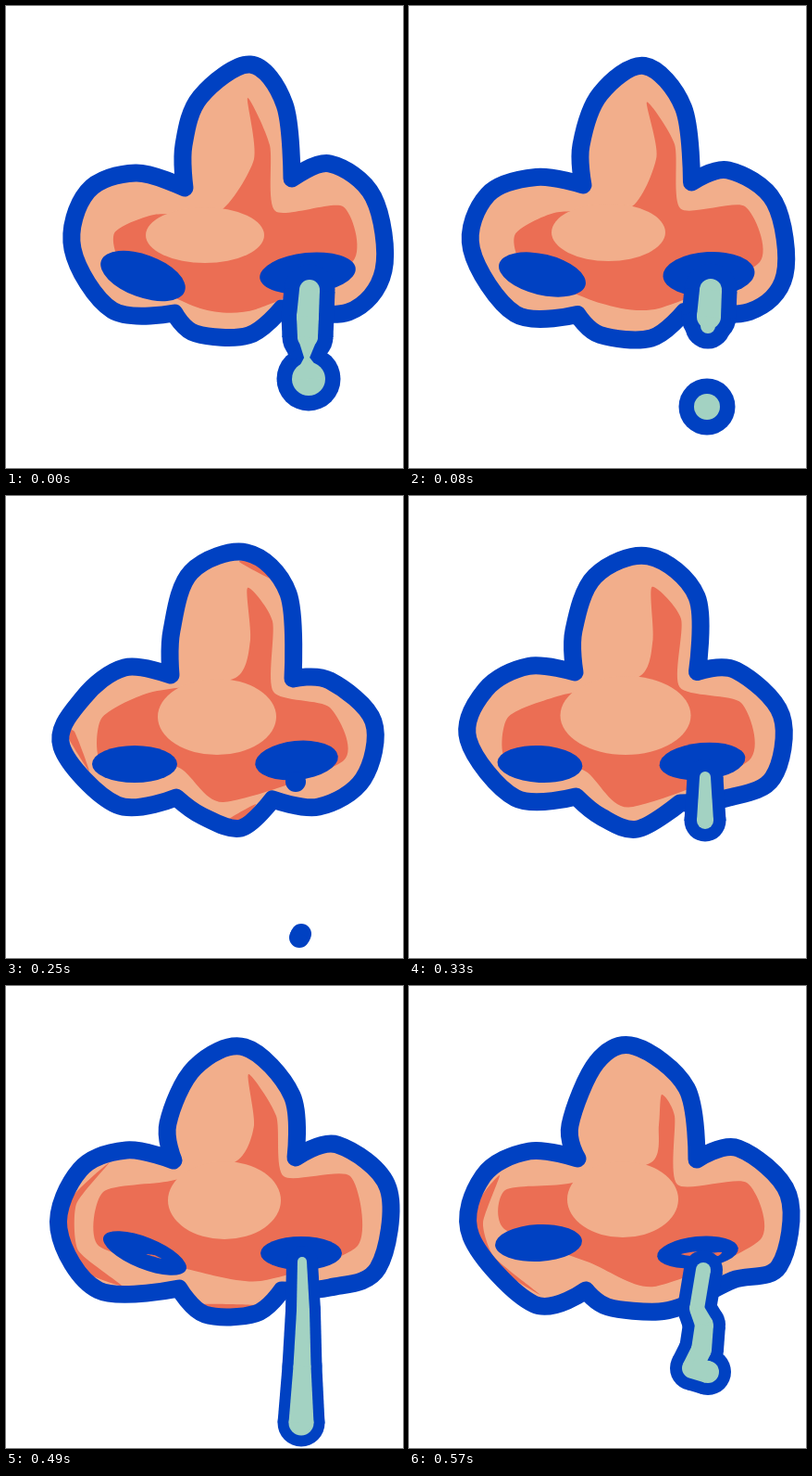
An HTML page with a canvas that plays this animation: 429 by 498 pixels, repeating every 630 ms.

```html
<!DOCTYPE html>
<html lang="en">
<head>
<meta charset="utf-8">
<title>Runny nose</title>
<style>
html, body { margin: 0; width: 100%; height: 100%; overflow: hidden; background: #fff; }
canvas { display: block; }
</style>
</head>
<body>
<canvas id="stage" width="429" height="498"></canvas>
<script>
const ctx = document.getElementById('stage').getContext('2d');
const BLUE = '#0041c2', SKIN = '#f2ae8b', RED = '#eb6e54', MUCUS = '#a3d2c2';
const LOOP = 630, LINE = 19;

const pairs = flat => flat.filter((_, i) => i % 2 === 0).map((x, i) => [x, flat[2 * i + 1]]);

// closed spline through the points; at corners the tangent is zero
function trace(flat, tension, isCorner = () => false) {
  const p = pairs(flat), n = p.length;
  const tangent = i => isCorner(i % n) ? [0, 0]
    : [0, 1].map(k => (p[(i + 1) % n][k] - p[(i + n - 1) % n][k]) * tension);
  ctx.beginPath();
  ctx.moveTo(...p[0]);
  for (let i = 0; i < n; i++) {
    const a = p[i], b = p[(i + 1) % n], u = tangent(i), v = tangent(i + 1);
    ctx.bezierCurveTo(a[0] + u[0], a[1] + u[1], b[0] - v[0], b[1] - v[1], ...b);
  }
  ctx.closePath();
}

function paint(color) {
  ctx.fillStyle = color;
  ctx.fill();
}

function oval(color, [x, y, rx, ry, tilt = 0]) {
  ctx.beginPath();
  ctx.ellipse(x, y, rx, ry, tilt, 0, Math.PI * 2);
  paint(color);
}

function patch(color, ...flat) {
  trace(flat, 0.1);
  paint(color);
}

// chain of x, y, radius nodes joined into one tube
function tube(color, nodes, grow) {
  let last;
  for (let i = 0; i < nodes.length; i += 3) {
    const [x, y] = nodes.slice(i), r = nodes[i + 2] + grow;
    if (r <= 0) continue;
    oval(color, [x, y, r, r]);
    if (last) {
      const d = Math.hypot(x - last.x, y - last.y);
      const nx = (last.y - y) / d, ny = (x - last.x) / d;
      ctx.beginPath();
      ctx.moveTo(last.x + nx * last.r, last.y + ny * last.r);
      ctx.lineTo(x + nx * r, y + ny * r);
      ctx.lineTo(x - nx * r, y - ny * r);
      ctx.lineTo(last.x - nx * last.r, last.y - ny * last.r);
      paint(color);
    }
    last = { x, y, r };
  }
}

function drip(rim, ...nodes) {
  tube(BLUE, nodes, rim);
  tube(MUCUS, nodes, 0);
}

// outline runs clockwise from the left notch
const isDent = i => [0, 5, 10, 13].includes(i);

function drawNose(nose, slivers = () => {}) {
  trace(nose.outline, 0.17, isDent);
  paint(SKIN);
  trace(nose.red, 0.12);
  paint(RED);
  oval(SKIN, nose.light);
  slivers();
  trace(nose.outline, 0.17, isDent);
  ctx.strokeStyle = BLUE;
  ctx.lineWidth = LINE;
  ctx.lineJoin = 'round';
  ctx.stroke();
  oval(BLUE, nose.left);
  oval(BLUE, nose.right);
}

const blend = (a, b) => Object.fromEntries(
  Object.keys(a).map(k => [k, a[k].map((v, i) => (v + b[k][i]) / 2)]));

const swollen = {
  outline: [193,196, 192,150, 210,98, 264,63, 301,106, 309,186, 350,170, 397,206, 408,285,
    370,330, 298,326, 262,355, 205,353, 182,331, 115,328, 72,262, 88,200, 140,180],
  red: [160,225, 117,245, 130,285, 210,326, 270,327, 375,275, 364,216, 291,221, 285,150,
    261,99, 268,165, 230,222],
  light: [215, 247, 64, 30],
  left: [148, 291, 48, 23, 0.35],
  right: [326, 288, 52, 22, -0.1]
};
const pointed = {
  outline: [183,190, 180,150, 203,92, 245,66, 292,113, 302,194, 340,184, 393,217, 404,295,
    366,329, 297,333, 262,361, 208,356, 182,334, 115,336, 63,262, 82,207, 135,189],
  red: [158,220, 112,248, 125,285, 205,315, 270,325, 383,277, 362,216, 296,216, 289,148,
    253,108, 267,160, 248,213],
  light: [216, 241, 59, 32],
  left: [140, 288, 48, 21, 0.12],
  right: [322, 290, 47, 26, 0]
};
const squat = {
  outline: [178,193, 179,145, 200,82, 260,61, 305,105, 310,197, 350,199, 397,243, 386,305,
    338,335, 288,327, 254,358, 212,345, 184,325, 120,333, 60,270, 83,218, 128,185],
  red: [155,212, 103,240, 105,290, 185,292, 235,330, 365,285, 350,228, 289,211, 288,135,
    261,99, 264,155, 248,196],
  light: [228, 238, 64, 41],
  left: [139, 289, 46, 20, 0],
  right: [314, 285, 45, 21, -0.1]
};
const rounded = {
  outline: [180,187, 177,145, 202,91, 258,69, 317,112, 313,182, 357,177, 408,230, 400,303,
    350,316, 298,335, 240,360, 204,347, 177,323, 110,318, 68,255, 82,200, 130,182],
  red: [165,220, 110,238, 108,285, 190,298, 240,341, 370,285, 368,218, 296,201, 300,130,
    264,97, 263,155, 250,193],
  light: [240, 235, 77, 44],
  left: [144, 289, 46, 20, 0.1],
  right: [320, 287, 48, 19, -0.08]
};
const wide = {
  outline: [181,188, 175,148, 204,88, 258,66, 309,118, 313,185, 358,171, 413,218, 402,304,
    350,325, 298,328, 270,353, 215,354, 187,326, 100,328, 57,262, 80,198, 130,177],
  red: [178,210, 105,222, 100,280, 195,305, 275,318, 380,280, 372,205, 300,205, 292,140,
    262,95, 268,150, 250,188],
  light: [236, 231, 61, 42],
  left: [150, 288, 48, 17, 0.38],
  right: [319, 288, 44, 18, 0]
};
const narrow = {
  outline: [182,186, 174,150, 203,82, 244,65, 300,110, 311,187, 356,175, 410,225, 400,302,
    350,317, 303,342, 270,351, 215,346, 191,328, 135,343, 67,270, 80,205, 130,178],
  red: [172,213, 104,220, 103,262, 195,298, 265,324, 380,273, 365,212, 290,214, 287,140,
    273,117, 270,150, 262,190],
  light: [231, 230, 60, 41],
  left: [140, 277, 47, 20, -0.05],
  right: [312, 287, 44, 17, -0.1]
};
const deflating = blend(swollen, pointed);
const filling = blend(squat, rounded);

function hanging() {
  drawNose(swollen, () => patch(RED, 297,130, 301,155, 302,180));
  drip(16.5, 328,306,11, 326,335,12, 326,357,11, 325,379,3, 327,402,18);
}

function breaking() {
  drawNose(deflating);
  drip(16.5, 326,306,12, 324,335,13, 323,345,8);
  drip(16.5, 322,432,14);
}

function falling() {
  drawNose(pointed);
  patch(RED, 124,287, 135,285, 150,289);
  drip(16.5, 307,315,17, 331,307,23);
  drip(16.5, 319,455,11);
}

function dry() {
  drawNose(squat, () => {
    patch(RED, 252,71, 276,71, 294,93);
    patch(RED, 238,350, 255,350, 270,332);
    patch(RED, 66,258, 74,254, 90,297);
  });
  drip(11, 313,308,0);
  drip(11, 319,472,0, 317,476,0);
}

function welling() {
  drawNose(filling);
  drip(13.5, 320,303,6, 320,350,9);
}

function running() {
  drawNose(rounded, () => {
    patch(RED, 357,184, 382,196, 401,233);
    patch(RED, 138,310, 178,308, 179,318, 138,318);
  });
  drip(13.5, 321,303,7, 320,360,11, 319,402,13);
}

function stretched() {
  drawNose(wide, () => {
    patch(RED, 112,190, 66,235, 72,300, 125,323, 78,285, 76,235);
    patch(RED, 212,343, 240,350, 268,344);
  });
  patch(RED, 151,289, 160,290, 168,294);
  drip(12, 320,297,5, 321,350,7, 320,410,9.5, 319,471,13.5);
}

function wobbling() {
  drawNose(narrow, () => patch(RED, 98,204, 74,235, 78,290, 142,333, 92,292, 80,255));
  patch(RED, 294,289, 312,286, 306,291);
  patch(RED, 325,288, 338,287, 334,291);
  drip(13, 318,306,8, 311,348,8, 319,365,10, 316,392,11, 306,412,11, 323,416,12);
}

const poses = [hanging, breaking, falling, dry, welling, running, stretched, wobbling];
const starts = [0, 80, 160, 250, 330, 410, 490, 570];

function tick() {
  const t = performance.now() % LOOP;
  ctx.fillStyle = '#fff';
  ctx.fillRect(0, 0, 429, 498);
  poses[starts.filter(s => s <= t).length - 1]();
  requestAnimationFrame(tick);
}
tick();
</script>
</body>
</html>
```
